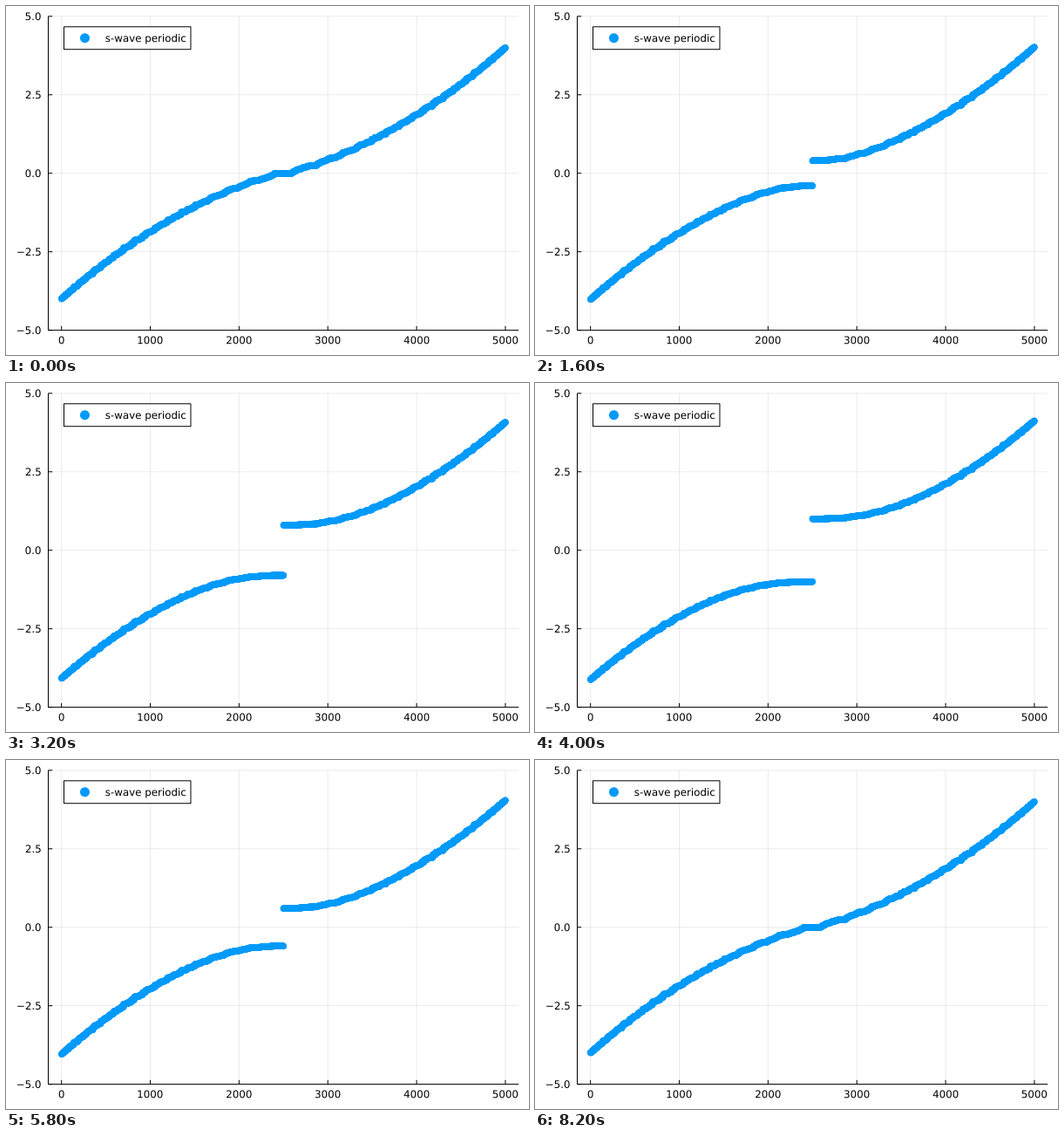
Animation of 600x400 px, one loop 8400 ms. Source, as a matplotlib script:

```python
import numpy as np
import matplotlib.pyplot as plt
from matplotlib.animation import FuncAnimation
from matplotlib.collections import EllipseCollection
from matplotlib.patches import Circle, PathPatch, Rectangle
from matplotlib.textpath import TextPath
from matplotlib.transforms import Affine2D

plt.rcParams["font.family"] = "DejaVu Sans"

W, H = 600, 400
PT = 0.72                     # points per pixel at 100 dpi
BLUE = "#009afa"
FONT = 11.85                  # pixels
CAP = 8.64                    # height of digits at that size
LEFT, RIGHT, TOP, BOTTOM = 48.48, 588.19, 11.81, 371.61
TICK = 4.72
RADIUS = 3.7

SITES = 50                    # lattice side, periodic in both directions
STATES = 2 * SITES**2
FRAMES = 42
GAP_STEP = 0.05

PAD = 0.03 * (STATES - 1)
X_MIN, X_MAX = 1 - PAD, STATES + PAD


def px(x):
    return LEFT + (x - X_MIN) / (X_MAX - X_MIN) * (RIGHT - LEFT)


def py(y):
    return TOP + (5 - y) / 10 * (BOTTOM - TOP)


fig = plt.figure(figsize=(W / 100, H / 100), dpi=100, facecolor="white")
ax = fig.add_axes([0, 0, 1, 1])
ax.set_xlim(0, W)
ax.set_ylim(H, 0)
ax.axis("off")


def line(x0, y0, x1, y1, z=2, **style):
    ax.plot([x0, x1], [y0, y1], color="black", lw=PT, zorder=z, snap=False,
            solid_capstyle="butt", **style)


def label(text, x, baseline, align):
    """Place text by its inked extent: align 0 is left, 0.5 centre, 1 right."""
    path = TextPath((0, 0), text, size=FONT)
    ink = path.get_extents()
    shift = x - ink.x0 - align * ink.width
    place = Affine2D().scale(1, -1).translate(shift, baseline)
    ax.add_patch(PathPatch(path, fc="black", lw=0, zorder=6,
                           transform=place + ax.transData))


for value in range(0, 5001, 1000):
    x = px(value)
    line(x, TOP, x, BOTTOM, z=1, alpha=0.08)
    line(x, BOTTOM, x, BOTTOM - TICK)
    label(str(value), x, 387.21, 0.5)

for value in (-5, -2.5, 0, 2.5, 5):
    y = py(value)
    line(LEFT, y, RIGHT, y, z=1, alpha=0.08)
    line(LEFT, y, LEFT + TICK, y)
    label(f"{value:.1f}".replace("-", "\u2212"), 39.7, y + CAP / 2, 1)

line(LEFT, BOTTOM, RIGHT, BOTTOM)
line(LEFT, TOP, LEFT, BOTTOM)

# Legend
box_x, box_y, box_w, box_h = 66.47, 23.8, 145.5, 25.92
mid = box_y + box_h / 2
ax.add_patch(Rectangle((box_x, box_y), box_w, box_h, fc="white", ec="black",
                       lw=PT, zorder=4, snap=False))
ax.add_patch(Circle((90.46, mid), 5.5, fc=BLUE, lw=0, zorder=5))
label("s-wave periodic", 114.4, mid + CAP / 2, 0)

# Tight-binding band on the square lattice
k = 2 * np.pi * np.arange(SITES) / SITES
band = -2 * (np.cos(k)[:, None] + np.cos(k)[None, :])
band_sq = np.sort(band.ravel() ** 2)
state_x = px(np.arange(1, STATES + 1))


def spectrum(gap):
    upper = np.sqrt(band_sq + gap**2)
    return np.concatenate([-upper[::-1], upper])


def positions(gap):
    return np.column_stack([state_x, py(spectrum(gap))])


size = np.full(STATES, 2 * RADIUS)
dots = EllipseCollection(size, size, np.zeros(STATES), units="xy",
                         offsets=positions(0), offset_transform=ax.transData,
                         facecolors=BLUE, linewidths=0, zorder=3)
ax.add_collection(dots, autolim=False)


def update(i):
    # The gap opens to 1, holds for one step and closes again.
    gap = GAP_STEP * min(i, FRAMES - 1 - i)
    dots.set_offsets(positions(gap))
    return (dots,)


anim = FuncAnimation(fig, update, frames=FRAMES, interval=200,
                     repeat=True, repeat_delay=0)
plt.show()
```
